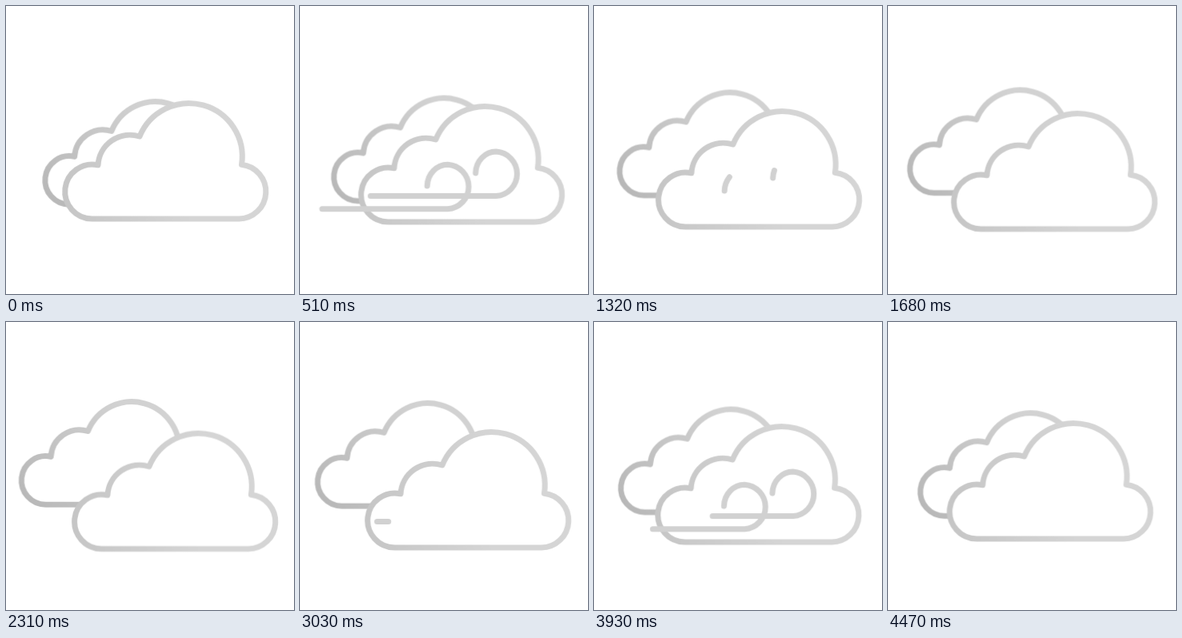
These frames come from a looping animation (360 px wide and 360 px high, 4500 ms). An HTML page:

```html
<!DOCTYPE html>
<html lang="en">
<head>
<meta charset="utf-8">
<title>Windy clouds</title>
<style>
  html, body { margin: 0; width: 100%; height: 100%; overflow: hidden; background: #fff; }
  svg { display: block; width: 100%; height: 100%; }

  .cloud { fill: #fff; stroke-width: 7; stroke-linejoin: round; vector-effect: non-scaling-stroke; }
  .wind {
    fill: none; stroke: #d1d1d1; stroke-width: 7; stroke-linecap: round;
    stroke-dasharray: 1 3; stroke-dashoffset: 1.02;
    animation: blow 4.5s linear infinite;
  }
  .late { animation-delay: 30ms; }

  .back { animation: drift-back 4.5s linear infinite; }
  .front { animation: drift-front 4.5s linear infinite; }

  @keyframes drift-back {
    0% { transform: translate(0, 0); }
    57% { transform: translate(-32.8px, -22.1px); }
    100% { transform: translate(-8.1px, -5.4px); }
  }
  @keyframes drift-front {
    0% { transform: translate(0, 0); }
    57% { transform: translate(13.2px, 19.5px); }
    100% { transform: translate(3.2px, 4.8px); }
  }
  /* one gust every 3 s: draw in, hold, run out through the curl */
  @keyframes blow {
    0% { stroke-dashoffset: 1.02; }
    10% { stroke-dashoffset: 0; }
    15.67% { stroke-dashoffset: 0; animation-timing-function: ease-in-out; }
    32% { stroke-dashoffset: -1.02; animation-timing-function: step-end; }
    66.667% { stroke-dashoffset: 1.02; }
    76.667% { stroke-dashoffset: 0; }
    82.333% { stroke-dashoffset: 0; animation-timing-function: ease-in-out; }
    98.667%, 100% { stroke-dashoffset: -1.02; }
  }
</style>
</head>
<body>
<svg viewBox="0 0 360 360">
  <defs>
    <linearGradient id="dark" gradientUnits="userSpaceOnUse" x1="75" y1="255" x2="220" y2="135">
      <stop offset="0" stop-color="#b8b8b8"/>
      <stop offset="1" stop-color="#d2d2d2"/>
    </linearGradient>
    <linearGradient id="light" gradientUnits="userSpaceOnUse" x1="72" y1="215" x2="230" y2="215">
      <stop offset="0" stop-color="#c6c6c6"/>
      <stop offset="1" stop-color="#d5d5d5"/>
    </linearGradient>
    <path id="cloud" class="cloud" d="M107.5 266 A34 34 0 1 1 115 198.8 A40 40 0 0 1 167 163
      A66.6 66.6 0 0 1 294.5 198.2 A34 34 0 0 1 291 266 Z"/>
    <path id="gust" pathLength="1" d="M25 249.7 H182 A27.8 27.8 0 0 0 182 194.2 A25.7 27.5 0 0 0 156.3 221"/>
  </defs>

  <g class="back">
    <use href="#cloud" stroke="url(#dark)" transform="translate(-16.7 11.3) scale(.89)"/>
  </g>
  <g class="front">
    <use href="#cloud" stroke="url(#light)"/>
    <use href="#gust" class="wind late"/>
    <use href="#gust" class="wind" transform="translate(60.5 -16.1)"/>
  </g>
</svg>
</body>
</html>
```
